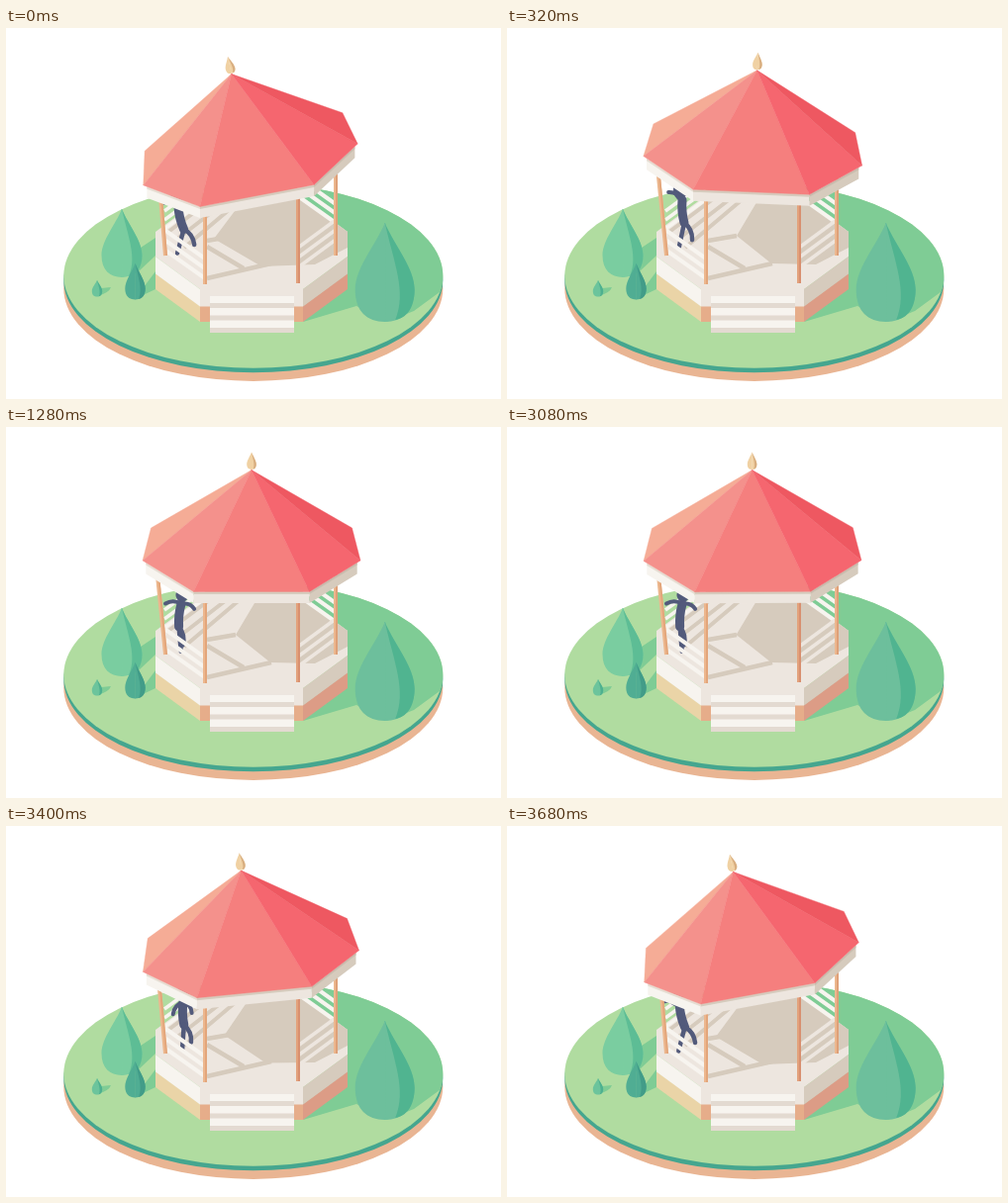
These frames come from a looping animation (500x375 px, 3720 ms). An HTML page:

```html
<!DOCTYPE html>
<html lang="en">
<head>
<meta charset="utf-8">
<title>Bandstand</title>
<style>
html, body { margin: 0; width: 100%; height: 100%; overflow: hidden; background: #fff; }
svg { display: block; width: 100%; height: 100%; }
</style>
</head>
<body>
<svg id="stage" viewBox="0 0 500 375" xmlns="http://www.w3.org/2000/svg"></svg>
<script>
const LOOP = 3720, STEP = 40, MID = 248;
const WHITE = '#f7f4ef', LIGHT = '#ede6df', BEIGE = '#d6cbbd', GRASS = '#b0dca0', SHADE = '#7fcc95', INK = '#525a7b';
const stage = document.getElementById('stage');

const path = (d, fill) => `<path d="${d}" fill="${fill}"/>`;
const poly = (pts, fill) => `<polygon points="${pts.join(' ')}" fill="${fill}"/>`;
const line = (d, color, w, cap = 'butt') =>
  `<path d="${d}" fill="none" stroke="${color}" stroke-width="${w}" stroke-linecap="${cap}"/>`;
const ellipse = cy => `<ellipse cx="249.8" cy="${cy}" rx="191.5" ry="93.3"/>`;
const clamp = u => Math.max(0, Math.min(1, u));
const smooth = u => u * u * (3 - 2 * u);
const mix = (a, b, u) => a + (b - a) * u;
const down = ([x, y], h) => [x, y + h];
// Left half of a shape, given as offsets from the middle, plus its mirror image
const mirror = half => [...half.map(([x, y]) => [MID - x, y]), ...half.map(([x, y]) => [MID + x, y]).reverse()];

// Walls of height h hanging from a row of corners
const walls = (row, h, colors) => colors.map((c, i) =>
  poly([row[i], row[i + 1], down(row[i + 1], h), down(row[i], h)], c)).join('');

// Teardrop with a darker right side
function drop(x, top, bottom, r, light, dark) {
  const h = bottom - top, y = bottom - r * 1.08;
  const side = k => `M${x},${top}C${x + k * .3},${top + h * .22} ${x + k},${y - h * .22} ${x + k},${y}`;
  const body = [r, -r].map(k =>
    path(`${side(k)}C${x + k},${bottom - r * .35} ${x + k * .6},${bottom} ${x},${bottom}H${x - k * .02}V${top}Z`, light)).join('');
  return body + path(`${side(r)}C${x + r},${bottom - r * .45} ${x + r * .7},${bottom - r * .1} ${x + r * .35},${bottom - r * .07}` +
    `C${x + r * .75},${bottom - h * .3} ${x + r * .3},${top + h * .4} ${x},${top}Z`, dark);
}

function rails(x1, y1, x2, y2, gap, color, w) {
  return [0, 1, 2].map(i => line(`M${x1},${y1 + gap * i}L${x2},${y2 + gap * i}`, color, w)).join('');
}

function post(x1, y1, x2, y2, light, dark) {
  return line(`M${x1},${y1}L${x2},${y2}`, light, 4) + line(`M${x1 + 1},${y1}L${x2 + 1},${y2}`, dark, 2);
}

function ground() {
  return `<g fill="#e9b593">${ellipse(263.6)}</g><g fill="#45a68f">${ellipse(255)}</g><g fill="${GRASS}">${ellipse(250.4)}</g>` +
    `<clipPath id="lawn">${ellipse(250.4)}</clipPath><g clip-path="url(#lawn)">` +
    path('M290,150H450V258L412,286L385,297L354,281L300,297L345,240V206L300,173Z', SHADE) +
    path('M117,252L136,222L151,212V230L134,246ZM130,274L151,246V264ZM92,271L96,263L106,262Q104,268 92,271Z', SHADE) + '</g>' +
    drop(117, 183, 252, 20.5, '#7acda0', '#5dbd95') +
    drop(130.5, 238, 274.5, 10.2, '#50ad93', '#429c88') +
    drop(92, 255, 271.5, 5.2, '#6cc49c', '#4eb08f') +
    drop(382.7, 197, 297, 30, '#6dbf9c', '#50b490');
}

const deck = mirror([[52, 173], [97, 206], [97, 231], [52, 264]]);

function base() {
  const edge = deck.slice(2, 6);
  return walls(edge.map(p => down(p, 17)), 16, ['#ead4a7', '#e6ad8a', '#dc9c86']) + walls(edge, 17.5, [WHITE, LIGHT, BEIGE]);
}

function stairs() {
  let s = `<rect x="206" y="270" width="85" height="38" fill="#e3dad1"/>`;
  for (let i = 0; i < 3; i++) s += `<rect x="206" y="${270.5 + i * 12.5}" width="85" height="7.5" fill="${WHITE}"/>`;
  return s;
}

function floor(k) {
  const shade = [[232 - 22 * k, 210 + 3 * k], [254 - 14 * k, 173], [345, 173], [345, 222], [312, 239], [267 - 9 * k, 238 + 3 * k]];
  return poly(deck, LIGHT) + `<clipPath id="deck">${poly(deck, LIGHT)}</clipPath><g clip-path="url(#deck)">` +
    line('M180,222L238,173M172,214L225,173M164,206L208,173', BEIGE, 4) +
    line('M203,215L232,210M203,221L240,243M203,253L268,238', BEIGE, 4.5) + poly(shade, BEIGE) + '</g>';
}

// Rim from back left round the front to back right
const rim = mirror([[101.5, 102], [110, 135], [58.5, 166.5]]);
const roofColors = ['#f5ac96', '#f4918c', '#f57f7e', '#f5666f', '#ee5861'];

function roofTilt(t) {
  if (t < 240) return mix(1, -.27, smooth(t / 240));
  if (t < 560) return mix(-.27, 0, smooth((t - 240) / 320));
  const u = clamp((t - 3060) / 660);
  return .6 * u + .4 * smooth(u);
}

function roof(tilt) {
  const turn = ([x, y]) => [
    x + tilt * (.21 * (y - 140) - .016 * (x - MID)),
    y + tilt * (3 - .19 * (x - MID))
  ];
  const top = turn([MID, 43.5]), r = rim.map(turn);
  const eave = rim.slice(1, 5).map(([x, y], i) => turn([mix(x, MID, i % 3 ? 0 : .03), i % 3 ? y : y + 2]));
  return walls(eave, 11.5, [WHITE, LIGHT, BEIGE]) + walls(eave, 2.5, ['#e6ddd2', BEIGE, '#c9bdae']) +
    roofColors.map((c, i) => poly([top, r[i], r[i + 1]], `${c}" stroke="${c}" stroke-width=".4`)).join('') +
    `<g transform="translate(${top}) rotate(${-12 * tilt})">${drop(0, -18, -.5, 4.8, '#f0d1a3', '#d8ae80')}</g>`;
}

// Neck x and y, then degrees from straight down: spine, left arm, right arm, left leg, right leg
const hang = [174, 181, 14, -105, -135, -15, 34];
const lifted = [177, 174, 5, -120, -150, -12, 25];
const stand = [176, 185, 5, -32, 35, -10, 15];
const reach = [177, 179, -6, -92, 70, 5, 12];
const ready = [179, 178, 2, -40, 38, -4, 22];
const moves = [[0, hang], [320, lifted], [560, stand], [820, stand], [1280, reach], [3060, reach], [3400, ready], [LOOP, hang]];

function person(t) {
  const i = moves.findIndex(m => t < m[0]);
  const [t0, from] = moves[i - 1], [t1, to] = moves[i];
  const u = smooth((t - t0) / (t1 - t0));
  const [x, y, spine, armL, armR, legL, legR] = from.map((v, k) => mix(v, to[k], u));
  const reachFrom = (p, deg, len) => {
    const a = deg * Math.PI / 180;
    return [p[0] + len * Math.sin(a), p[1] + len * Math.cos(a)];
  };
  // A limb bows to one side halfway along
  const limb = (p, deg, len, bow, w) => {
    const bend = reachFrom(reachFrom(p, deg, len / 2), deg + 90, bow);
    return line(`M${p}Q${bend} ${reachFrom(p, deg, len)}`, INK, w, 'round');
  };
  const neck = [x, y], hip = reachFrom(neck, spine, 23), head = reachFrom(neck, spine, -9);
  return `<circle cx="${head[0]}" cy="${head[1]}" r="6.5" fill="${INK}"/>` +
    limb(neck, spine, 23, -2, 9) +
    limb(neck, armL, 16, -5, 4) + limb(neck, armR, 14, 5, 4) +
    limb(hip, legL, 25, 0, 4.5) + limb(hip, legR, 19, 5, 4.5);
}

const scene = ground();
const backRails = rails(160, 185, 201, 155, 9, WHITE, 3.5) + rails(295, 151, 333, 178, 9.5, WHITE, 4);
const frontRails = rails(160, 204, 201, 233, 10, WHITE, 4) + rails(295, 222, 333, 194, 10, LIGHT, 3.5);
const front = base() + stairs();

function draw(t) {
  const tilt = roofTilt(t), k = Math.max(0, tilt);
  stage.innerHTML = scene + floor(k) + backRails + front + person(t) + frontRails +
    post(333, 145, 333, 230, '#ecb78e', '#dea078') +
    post(153 + 3 * k, 150 + 20 * k, 161, 230, '#ecb78e', '#e3a67b') +
    post(201, 172, 201, 259, '#ecb78e', '#e3a67b') +
    post(295, 165, 295, 258, '#e3a27c', '#d89070') +
    roof(tilt);
}

function tick() {
  const t = performance.now() % LOOP;
  draw(Math.floor(t / STEP) * STEP);
  requestAnimationFrame(tick);
}
tick();
</script>
</body>
</html>
```
